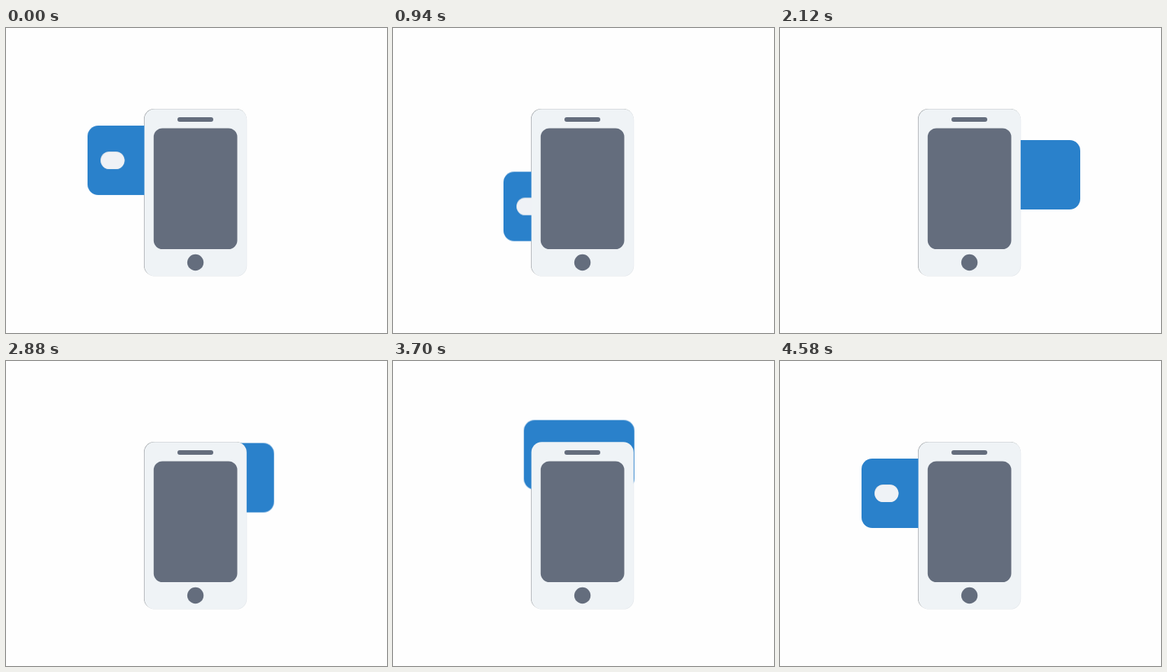
An HTML page for the animation above (4.6 s loop, 500 by 400 pixels).

```html
<!DOCTYPE html>
<html lang="en">
<head>
<meta charset="utf-8">
<title>Phone and card</title>
<style>
  html, body { margin: 0; width: 100%; height: 100%; overflow: hidden; background: #fefefe; }
  svg { display: block; width: 500px; height: 400px; }
</style>
</head>
<body>
<svg viewBox="0 0 500 400">
  <!-- thin grey rim that the card covers -->
  <rect x="181" y="106" width="134.6" height="219" rx="13.5" fill="#92969a"/>
  <rect x="182.2" y="107" width="134" height="218.6" rx="13.5" fill="#e2e6ea"/>

  <g id="card">
    <rect width="145" height="91" rx="14" fill="#2a81cb"/>
    <rect x="17" y="34" width="31.5" height="23" rx="11.5" fill="#d3d9df"/>
    <rect x="17.4" y="34.6" width="31" height="22.4" rx="11.2" fill="#eff2f6"/>
  </g>

  <rect x="181.6" y="106.3" width="134.2" height="218.8" rx="13.5" fill="#eff3f6"/>
  <g fill="#646d7d">
    <rect x="225" y="117" width="47" height="6" rx="3"/>
    <rect x="193.8" y="131.5" width="109.7" height="158.5" rx="11.5"/>
    <circle cx="248.6" cy="307.5" r="10.7"/>
  </g>
</svg>
<script>
  const LOOP = 4600, GLIDE = 915;
  const EASE = "cubic-bezier(.333,.2,.667,1)";

  // resting places around the phone, each with the time the card leaves it
  const stops = [
    { leave: 0, x: 107, y: 128 },
    { leave: 1203, x: 145, y: 188.5 },
    { leave: 2435, x: 249, y: 147 },
    { leave: 3670, x: 173.2, y: 76.3 }
  ];

  const pose = (time, { x, y }, easing = "linear") =>
    ({ offset: time / LOOP, transform: `translate(${x}px, ${y}px)`, easing });

  const frames = stops.flatMap((stop, i) => [
    pose(stop.leave, stop, EASE),
    pose(stop.leave + GLIDE, stops[(i + 1) % stops.length])
  ]);
  frames.push(pose(LOOP, stops[0]));

  document.getElementById("card").animate(frames, { duration: LOOP, iterations: Infinity });
</script>
</body>
</html>
```
